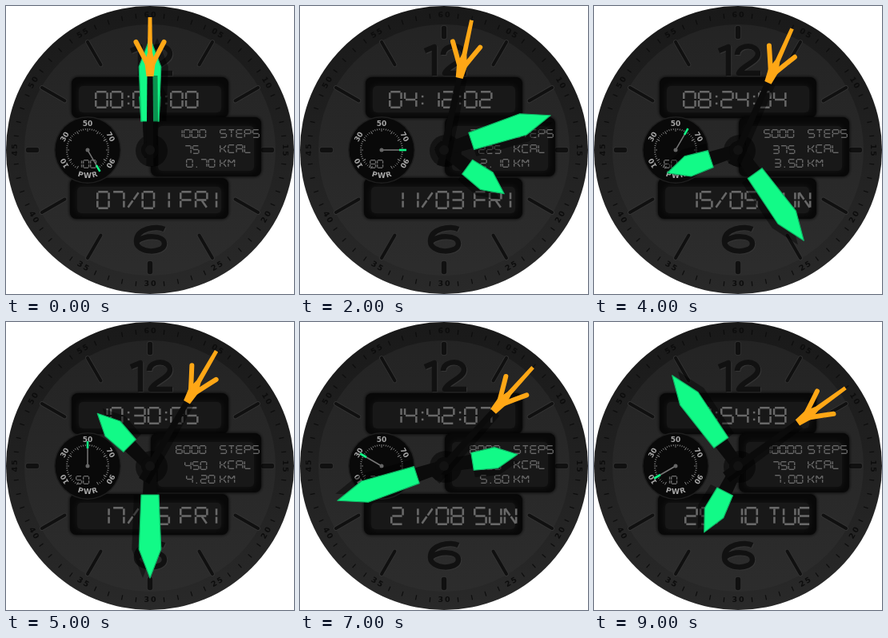
Recreate the animation shown at these times as an HTML page with a canvas. Size 360 by 360 pixels, loop 10000 ms.

```html
<!DOCTYPE html>
<html lang="en">
<head>
<meta charset="utf-8">
<title>Watch face</title>
<style>
html, body { margin: 0; width: 100%; height: 100%; overflow: hidden; background: #fff; }
canvas { display: block; width: 360px; height: 360px; }
</style>
</head>
<body>
<canvas id="face" width="360" height="360"></canvas>
<script>
const ctx = document.getElementById('face').getContext('2d');
const TAU = Math.PI * 2, DEG = Math.PI / 180;
const GREEN = '#12fa87', ORANGE = '#ffa716', DARK = '#0b0b0b';
const LCD = '#686868', PRINT = '#a8a8a8', SHADOW = 'rgba(0, 0, 0, .42)';

// Segment ends on a unit cell: x1, y1, x2, y2
const SEGMENTS = {
  a: [0, 0, 1, 0], b: [1, 0, 1, .5], c: [1, .5, 1, 1], d: [0, 1, 1, 1],
  e: [0, .5, 0, 1], f: [0, 0, 0, .5], g: [0, .5, 1, .5], o: [0, .5, .5, .5],
  i: [.5, 0, .5, .5], l: [.5, .5, .5, 1],
  h: [0, 0, .5, .5], k: [1, 0, .5, .5], m: [0, 1, .5, .5], n: [.5, .5, 1, 1]
};
const GLYPHS = {
  0: 'abcdef', 1: 'bc', 2: 'abged', 3: 'abgcd', 4: 'fgbc', 5: 'afgcd',
  6: 'afgedc', 7: 'abc', 8: 'abcdefg', 9: 'abcdfg', '/': 'km', ' ': '',
  A: 'abcefg', C: 'adef', D: 'abcdil', E: 'adefg', F: 'aefg', I: 'il',
  K: 'efokn', L: 'def', M: 'bcefhk', N: 'bcefhn', P: 'abefg', R: 'abefgn',
  S: 'afgcd', T: 'ail', U: 'bcdef', W: 'bcefmn'
};

function circle(x, y, r, fill) {
  ctx.beginPath();
  ctx.arc(x, y, r, 0, TAU);
  ctx.fillStyle = fill;
  ctx.fill();
}

function line(x1, y1, x2, y2, width, color, cap = 'butt') {
  ctx.beginPath();
  ctx.moveTo(x1, y1);
  ctx.lineTo(x2, y2);
  ctx.lineWidth = width;
  ctx.lineCap = cap;
  ctx.strokeStyle = color;
  ctx.stroke();
}

function polygon(points, fill, dx = 0) {
  ctx.beginPath();
  points.forEach(([x, y]) => ctx.lineTo(x + dx, y));
  ctx.closePath();
  ctx.fillStyle = fill;
  ctx.fill();
}

function rotated(x, y, degrees, draw) {
  ctx.save();
  ctx.translate(x, y);
  ctx.rotate(degrees * DEG);
  draw();
  ctx.restore();
}

function fade(top, bottom) {
  const shade = ctx.createLinearGradient(0, 0, 0, 360);
  shade.addColorStop(0, top);
  shade.addColorStop(1, bottom);
  return shade;
}

function label(text, x, y, size, color, spacing = 0) {
  ctx.font = `bold ${size}px "DejaVu Sans", sans-serif`;
  ctx.letterSpacing = spacing + 'px';
  ctx.textAlign = 'center';
  ctx.textBaseline = 'middle';
  ctx.fillStyle = color;
  ctx.fillText(text, x + spacing / 2, y);
}

// Segmented text; (x, y) is the top left of the first cell
function lcd(text, x, y, h, step, thick, gapStep = step * .5) {
  const w = step * .76;
  for (const ch of text) {
    const px = u => x + thick / 2 + u * w;
    const py = v => y + thick / 2 + v * (h - thick);
    if (ch === ':' || ch === '.') {
      ctx.fillStyle = LCD;
      for (const v of ch === ':' ? [.3, .75] : [1]) {
        ctx.fillRect(x + gapStep * .35, py(v) - thick / 2, thick, thick);
      }
      x += gapStep;
      continue;
    }
    for (const key of GLYPHS[ch]) {
      const [x1, y1, x2, y2] = SEGMENTS[key];
      const ax = px(x1), ay = py(y1), dx = px(x2) - ax, dy = py(y2) - ay;
      const cut = .4 * thick / Math.hypot(dx, dy);
      line(ax + dx * cut, ay + dy * cut, ax + dx * (1 - cut), ay + dy * (1 - cut), thick, LCD);
    }
    x += ch === ' ' ? gapStep : step;
  }
}

function softRect(x, y, w, h, radius, fill, blur, glow) {
  ctx.save();
  ctx.shadowColor = glow;
  ctx.shadowBlur = blur;
  ctx.beginPath();
  ctx.roundRect(x, y, w, h, radius);
  ctx.fillStyle = fill;
  ctx.fill();
  ctx.restore();
}

function panel(x, y, w, h) {
  softRect(x, y, w, h, 8, '#070707', 4, '#000');
  softRect(x + 9, y + 11, w - 18, h - 18, 5, '#181818', 9, '#181818');
}

function numerals(color) {
  ctx.strokeStyle = color;
  ctx.lineWidth = 6.5;
  ctx.lineCap = 'butt';
  ctx.lineJoin = 'round';
  ctx.stroke(new Path2D('M156 56L168 51V87M179 61C179 47 205 47 205 60C205 70 184 75 181 84H208'));
  ctx.stroke(new Path2D('M198 279C188 274 163 278 163 294C163 310 198 310 198 297C198 286 172 286 164 294'));
}

function marker(outer, inner, width) {
  line(0, -outer, 0, -inner, width + 1.5, '#353535', 'round');
  line(0, -outer, 0, -inner, width, '#101010', 'round');
}

function dial() {
  ctx.clearRect(0, 0, 360, 360);
  circle(180, 180, 180, fade('#191919', '#292929'));
  circle(180, 180, 157, fade('#232323', '#2d2d2d'));

  for (let i = 0; i < 60; i++) {
    rotated(180, 180, i * 6, () => {
      if (i % 5) {
        line(0, -171, 0, -165, 1.2, '#0d0d0d');
        return;
      }
      if (i % 15) marker(156, 123, 4);
      else marker(152, 142, 6.5);
      ctx.translate(0, -168);
      if (i > 15 && i < 45) ctx.rotate(Math.PI);
      label(String(i || 60).padStart(2, '0'), 0, 0, 9.5, '#0d0d0d', 2);
    });
  }
  ctx.save();
  ctx.translate(1, 1);
  numerals('#343434');
  ctx.restore();
  numerals('#111');

  panel(82, 89, 196, 51);
  panel(80, 215, 198, 51);
  panel(181, 139, 138, 74);
}

function power(value) {
  circle(102, 180, 42, '#1e1e1e');
  circle(102, 180, 40.5, '#090909');
  for (let a = -150; a <= 150; a += 6) {
    rotated(102, 180, a, () => line(0, -27, 0, a % 30 ? -25 : -23, .9, '#858585'));
  }
  for (let n = 10; n <= 90; n += 20) {
    rotated(102, 180, (n - 50) * 3, () => label(n, 0, -32.5, 9, PRINT));
  }
  [...'PWR'].forEach((ch, i) => rotated(102, 180, 16 - 16 * i, () => label(ch, 0, 32.5, 9, PRINT)));
  lcd(String(value), 87, 192, 11, 9, 1.4);
  rotated(102, 180, (value - 50) * 3, () => {
    line(0, 2, 0, -23, 1.5, '#777');
    line(0, -22, 0, -31, 2.6, GREEN);
  });
  circle(102, 180, 2.5, '#666');
}

function hand(degrees, shoulder, tip, width) {
  const lume = [[-11, -36], [-width, -shoulder], [0, -tip], [width, -shoulder], [11, -36]];
  const arm = [[-7, 10], [-9, -37], [9, -37], [7, 10]];
  rotated(180, 180, degrees, () => {
    polygon(lume, SHADOW, 9);
    polygon(arm, DARK);
    polygon(lume, GREEN);
    ctx.lineWidth = 1.2;
    ctx.lineJoin = 'round';
    ctx.strokeStyle = '#0fb766';
    ctx.stroke();
  });
}

function secondHand(degrees) {
  const stem = [[-4.5, 20], [-3.5, -93], [3.5, -93], [4.5, 20]];
  rotated(180, 180, degrees, () => {
    polygon(stem, SHADOW, 6);
    polygon(stem, DARK);
    polygon([[-4.5, -92], [-6.5, -108], [-3, -122], [-2.4, -166],
      [2.4, -166], [3, -122], [6.5, -108], [4.5, -92]], ORANGE);
    for (const side of [-1, 1]) {
      ctx.beginPath();
      ctx.moveTo(side * 2.5, -106);
      ctx.quadraticCurveTo(side * 9, -119, side * 17.5, -135);
      ctx.lineWidth = 6;
      ctx.lineCap = 'round';
      ctx.strokeStyle = ORANGE;
      ctx.stroke();
    }
  });
}

const two = n => String(n).padStart(2, '0');

function draw(k) {
  const hours = 2 * k, minutes = 6 * k, day = 7 + 2 * k, month = 1 + k;
  const weekday = ['SUN', 'MON', 'TUE', 'WED', 'THU', 'FRI', 'SAT'][new Date(2022, k, day).getDay()];
  dial();
  lcd(`${two(hours)}:${two(minutes)}:${two(k)}`, 111, 106, 22, 18.8, 2.5);
  lcd(`${two(day)}/${two(month)} ${weekday}`, 113, 231, 23, 18.8, 2.6, 10);
  lcd(String(1000 * (k + 1)), 212, 154, 11, 9.8, 1.4);
  lcd(String(75 * (k + 1)), 223, 174, 11, 9.8, 1.4);
  lcd((.7 * (k + 1)).toFixed(2), 225, 191, 11, 9.8, 1.4, 8);
  lcd('STEPS', 267, 154, 11, 10.2, 1.4);
  lcd('KCAL', 267, 173, 11, 10.2, 1.4);
  lcd('KM', 267, 191, 11, 10.2, 1.4);
  power(100 - 10 * k);

  circle(182, 181, 20, 'rgba(0, 0, 0, .5)');
  hand(hours * 30 + minutes / 2, 66, 93, 13.2);
  hand(minutes * 6, 104, 140, 13.8);
  circle(180, 180, 11, DARK);
  secondHand(k * 6);
  circle(180, 180, 6, '#121212');
}

let shown = -1;
const start = performance.now();
function tick() {
  const k = Math.floor((performance.now() - start) / 1000) % 10;
  if (k !== shown) draw(shown = k);
  requestAnimationFrame(tick);
}
tick();
</script>
</body>
</html>
```
